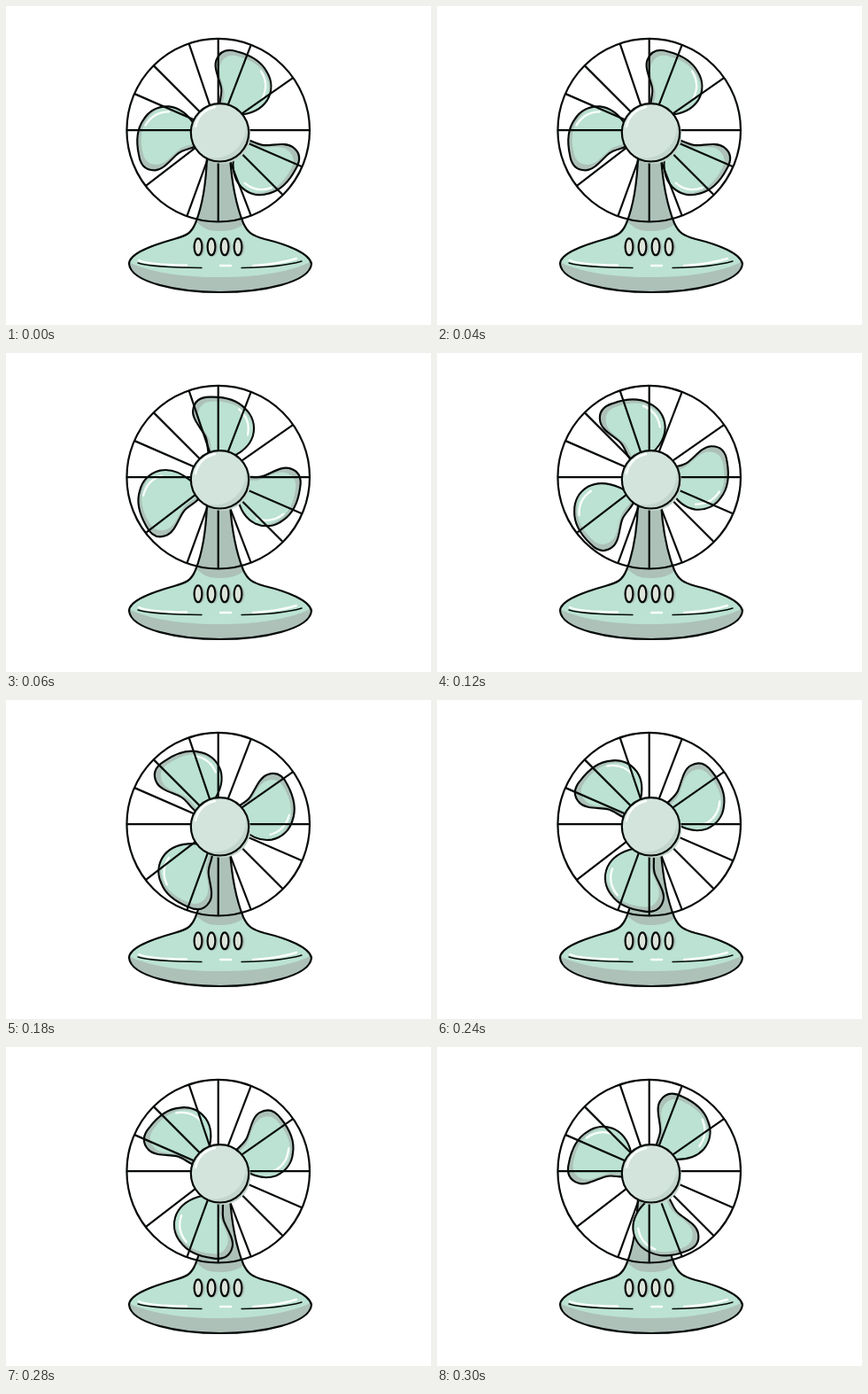
Recreate the animation shown at these times as an HTML page. Size 480 by 360 pixels, loop 360 ms.

```html
<!DOCTYPE html>
<html lang="en">
<head>
<meta charset="utf-8">
<title>Desk fan</title>
<style>
  html, body { margin: 0; width: 100%; height: 100%; overflow: hidden; background: #fff; }
  svg { display: block; width: 100%; height: 100%; }
  .ink { fill: none; stroke: #060a09; stroke-width: 2.2; stroke-linecap: round; stroke-linejoin: round; }
  .shine { fill: none; stroke: #fbfffd; stroke-width: 2.4; stroke-linecap: round; }
  .mint { fill: #bbe2d2; }
  .grey { fill: #adc1b9; }
</style>
</head>
<body>
<svg viewBox="0 0 480 360">
  <defs>
    <path id="shape" d="M-6-20C-14-34-10-42-15-51C-20-60-31-70-30-80C-29-91-22-96-10-96C8-97 22-92 30-84C38-77 43-66 40-53C37-42 28-33 14-27Z"/>
    <clipPath id="inShape"><use href="#shape"/></clipPath>
    <g id="blade">
      <use href="#shape" class="grey"/>
      <g clip-path="url(#inShape)"><use href="#shape" class="mint" transform="translate(3 0) scale(.9 .95)"/></g>
      <path class="shine" d="M23-83Q37-71 34-54"/>
      <use href="#shape" class="ink"/>
    </g>
    <path id="stand" d="M227 170C226 200 222 225 214 245C209 257 204 259 190 263C165 270 139 279 139 291C141 312 194 323 242 323C290 323 343 312 345 291C343 279 317 269 292 263C278 259 273 256 268 245C260 225 255 200 253 170Z"/>
    <clipPath id="inStand"><use href="#stand"/></clipPath>
  </defs>

  <use href="#stand" class="mint"/>
  <g clip-path="url(#inStand)" class="grey">
    <path d="M200 165H280V240C267 243 268 254 241 254C216 254 224 242 200 240Z"/>
    <path d="M136 288C165 302 205 306 242 306C282 306 320 301 348 287V326H136Z"/>
  </g>
  <path class="shine" d="M150 287Q160 292 204 292.5M279 293Q310 291 328 285M242 293H254"/>
  <path class="ink" style="stroke-width:1.4" d="M149 290Q165 295 221 295.5M266 295.5Q310 295 334 288"/>
  <use href="#stand" class="ink"/>
  <g id="slots"></g>

  <g id="blades"></g>

  <circle class="ink" cx="239.7" cy="140.2" r="103.3"/>
  <path id="spokes" class="ink" style="stroke-linecap:butt"/>
  <circle cx="241.5" cy="142.8" r="32.7" fill="#d3e4dc"/>
  <path d="M270 127A32 32 0 0 1 222 169A36 36 0 0 0 270 127Z" fill="#c3d6cd"/>
  <path class="shine" d="M214 136Q218 118 236 114"/>
  <circle class="ink" cx="241.5" cy="142.8" r="32.7"/>
</svg>
<script>
const $ = id => document.getElementById(id);

$('slots').innerHTML = [217, 232, 247, 262].map(x =>
  `<ellipse class="grey" cx="${x + 2}" cy="272.5" rx="5.5" ry="10"/>
   <ellipse class="ink" style="fill:#dde4da" cx="${x}" cy="271.8" rx="4.4" ry="9.4"/>`).join('');

const spokes = [0, 35, 69, 90, 108.7, 135, 156.5, 180, 217.5, 250, 270, 291, 315, 336.5];
$('spokes').setAttribute('d', spokes.map(deg => {
  const a = deg * Math.PI / 180;
  return `M239.7 140.2l${103 * Math.cos(a)} ${-103 * Math.sin(a)}`;
}).join(''));

// One blade's uneven trip round the hub; the three blades are a third of the list apart.
const turn = [-18, -2, 17, 32, 50, 76, 99, 117, 133, 155, 170, 198, 239, 259, 277, 295, 306, 333];
const HOLD = 60, STEPS = 6;
$('blades').innerHTML = '<use href="#blade"/>'.repeat(3);
const blades = [...$('blades').children];

function draw(now) {
  const step = Math.floor(now / HOLD) % STEPS;
  // The axle wobbles sideways once per loop.
  const x = 239 - 3.7 * Math.cos((step - 2.2) / STEPS * 2 * Math.PI);
  blades.forEach((b, i) =>
    b.setAttribute('transform', `translate(${x} 144) rotate(${-turn[step + i * STEPS]}) scale(.98)`));
  requestAnimationFrame(draw);
}
draw(performance.now());
</script>
</body>
</html>
```
